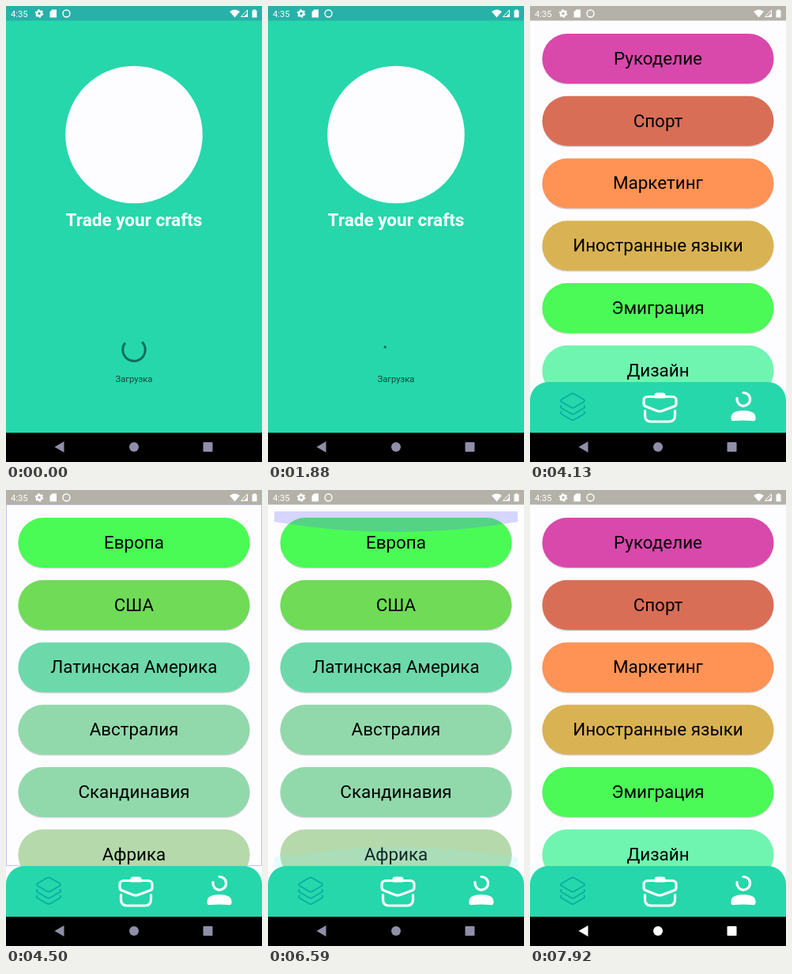
Recreate the animation shown at these times as an HTML page. Size 324 by 576 pixels, loop 8 s.

```html
<!DOCTYPE html>
<html lang="ru">
<head>
<meta charset="utf-8">
<style>
  html, body { margin: 0; width: 100%; height: 100%; overflow: hidden; background: #fdfdff; }
  svg { display: block; width: 100vw; height: 100vh; font-family: Roboto, sans-serif; }
  .item { font-size: 22.4px; text-anchor: middle; fill: #000; }
  .line { fill: none; stroke-linecap: round; stroke-linejoin: round; }
</style>
</head>
<body>
<svg viewBox="0 0 324 576">
  <defs>
    <clipPath id="port"><rect y="27" width="324" height="449"/></clipPath>
    <clipPath id="inner"><rect x="8" y="27" width="308" height="449"/></clipPath>
  </defs>
  <rect width="324" height="576" fill="#fdfdff"/>

  <g id="app">
    <g clip-path="url(#port)">
      <g id="topics"></g>
      <g id="regions"></g>
    </g>
    <rect id="frame" x=".5" y="18.5" width="323" height="456" fill="none" stroke="#c6c3ee"/>
    <g clip-path="url(#inner)">
      <path id="glowTop"/>
      <path id="glowBottom"/>
    </g>
    <path d="M0 540V498A23 23 0 0 1 23 475H301A23 23 0 0 1 324 498V540Z" fill="#26d7ab"/>
    <g class="line" stroke="#08aea2" stroke-width="1.800">
      <path d="M52 490Q54 489 56 490L68 497Q70 498.500 68 500L56 507Q54 508 52 507L40 500Q38 498.500 40 497Z"/>
      <path d="M39.500 505Q38 506.500 40 508L52 515Q54 516 56 515L68 508Q70 506.500 68.500 505"/>
      <path d="M39.500 512.500Q38 514 40 515.500L52 522.500Q54 523.500 56 522.500L68 515.500Q70 514 68.500 512.500"/>
    </g>
    <g class="line" stroke="#fff" stroke-width="3.200">
      <path d="M158 493.500H149Q144 493.500 144 498.500V502Q144 505 147 506L161 511.500Q164 512.500 167 511.500L182 506Q185 505 185 502V498.500Q185 493.500 180 493.500H170"/>
      <path d="M145.500 511.500V517Q145.500 525 153 525H176Q183.500 525 183.500 517V511.500"/>
      <path d="M159 494V492Q159 490 161 490H168Q170 490 170 492V494Z" fill="#fff"/>
      <path d="M270 488.500A8.300 8.300 0 1 1 262 495.500"/>
    </g>
    <path fill="#fff" d="M257 514Q262 511 270 511T283 514Q286 517 285.500 522Q285 525 281 524Q276 523.500 270 523.500T259 524Q255 525 254.500 522Q254 517 257 514Z"/>
  </g>

  <g id="splash">
    <rect width="324" height="540" fill="#26d7ab"/>
    <circle cx="162" cy="162.500" r="86.800" fill="#fdfdff"/>
    <text x="162" y="278" font-size="22.500" font-weight="700" text-anchor="middle" fill="#fff">Trade your crafts</text>
    <path id="spinner" fill="none" stroke="#0a6f5c" stroke-width="3"/>
    <text x="162" y="474.500" font-size="11.200" text-anchor="middle" fill="#0b4a3d">Загрузка</text>
  </g>

  <rect id="status" width="324" height="18.500"/>
  <g fill="#fff">
    <text x="6" y="13.800" font-size="11.200">4:35</text>
    <circle cx="42" cy="9.500" r="3" fill="none" stroke="#fff" stroke-width="2.400"/>
    <circle cx="42" cy="9.500" r="4.500" fill="none" stroke="#fff" stroke-width="1.600" stroke-dasharray="2.360 2.352"/>
    <path d="M58.500 4.500H64V14.500H55.500V7.500Z"/>
    <circle cx="76.500" cy="9.500" r="4.500" fill="none" stroke="#fff" stroke-width="1.400"/>
    <path d="M283 7Q289.500 2 296 7L289.500 14.500Z"/>
    <path d="M305.500 5V13.500H297.500Z" fill="none" stroke="#fff"/>
    <path d="M306 8.500V14H300.500Z"/>
    <path d="M313 4.500H316V5.500H317.500V14.500H311.500V5.500H313Z"/>
  </g>

  <rect y="539" width="324" height="37"/>
  <g id="keys">
    <path d="M61.500 557L73.500 550V564Z"/>
    <circle cx="162" cy="557" r="6"/>
    <rect x="249.500" y="551" width="12" height="12" rx="1"/>
  </g>
</svg>

<script>
const LOOP = 8000;
const OPEN = 2000, ENTER = 4200, ENTERED = 4520, KEYS = 7000, BACK = 7150;
const $ = id => document.getElementById(id);

const topics = [
  ['Рукоделие', '#d948ab'], ['Спорт', '#d96e56'], ['Маркетинг', '#ff9356'],
  ['Иностранные языки', '#d9b353'], ['Эмиграция', '#4bf957'], ['Дизайн', '#70f5b0']
];
const regions = [
  ['Европа', '#4bfb55'], ['США', '#6fdb57'], ['Латинская Америка', '#6dd9ab'],
  ['Австралия', '#91d9ab'], ['Скандинавия', '#91d9ab'], ['Африка', '#b5d9ab']
];

const pills = list => list.map(([label, color], i) => {
  const y = 35 + i * 78.75;
  const pill = (top, fill) =>
    `<rect x="15.500" y="${top}" width="293" height="63" rx="31.500" fill="${fill}"/>`;
  return pill(y + 1.3, '#d3d0d6') + pill(y, color) +
    `<text class="item" x="162" y="${y + 38.8}">${label}</text>`;
}).join('');
$('topics').innerHTML = pills(topics);
$('regions').innerHTML = pills(regions);

const clamp = x => Math.max(0, Math.min(1, x));
const ramp = (t, a, b) => clamp((t - a) / (b - a));
const out = x => 1 - (1 - x) ** 3;
const show = (id, on) => $(id).setAttribute('display', on ? 'inline' : 'none');

// Fast-out, slow-in: cubic-bezier(.4, 0, .2, 1)
function standard(x) {
  let lo = 0, hi = 1;
  for (let i = 0; i < 20; i++) {
    const s = (lo + hi) / 2, r = 1 - s;
    if (1.2 * r * r * s + 0.6 * r * s * s + s ** 3 < x) lo = s; else hi = s;
  }
  return 3 * (1 - lo) * lo * lo + lo ** 3;
}

function spin(t) {
  const turn = t / 1333.3 + 0.575, phase = turn % 1;
  const tail = 270 * standard(clamp(phase * 2 - 1));
  const head = 270 * standard(clamp(phase * 2)) + 11;
  const base = 297 + 0.2295 * t + 270 * Math.floor(turn);
  const point = deg => {
    const a = deg * Math.PI / 180;
    return `${162 + 14.2 * Math.cos(a)} ${434.3 + 14.2 * Math.sin(a)}`;
  };
  const large = head - tail > 180 ? 1 : 0;
  $('spinner').setAttribute('d',
    `M${point(base + tail)}A14.2 14.2 0 ${large} 1 ${point(base + head)}`);
}

// Overscroll glow; it turns from lavender to cyan as it fades
function glow(id, edge, dir, depth, alpha, fade) {
  const sag = Math.min(depth, 6 + depth * 0.26);
  const side = edge + dir * (depth - sag);
  const peak = edge + dir * (depth + sag);
  const el = $(id);
  el.setAttribute('d', `M8 ${edge}V${side}Q162 ${peak} 316 ${side}V${edge}Z`);
  el.setAttribute('fill', `rgb(110,${Math.min(255, 110 + 200 * fade)},255)`);
  el.setAttribute('opacity', 0.28 * alpha * (1 - fade * fade));
}

function draw(t) {
  const splash = t < OPEN;
  show('splash', splash);
  show('app', !splash);
  $('status').setAttribute('fill', splash ? '#27b1a9' : '#b4b2a8');
  $('keys').setAttribute('fill', t >= KEYS ? '#fff' : '#918ea9');
  if (splash) return spin(t);

  const inside = t >= ENTER && t < BACK;
  const enter = out(ramp(t, ENTER, ENTERED));
  show('topics', !inside || enter < 1);
  show('regions', inside);
  show('frame', inside && t < ENTERED + 60);
  $('topics').setAttribute('opacity', inside ? 1 - enter : 1);
  $('regions').setAttribute('opacity', enter);

  const scroll = 24 * (out(ramp(t, 5150, 5380)) - out(ramp(t, 6080, 6280)));
  const scale = 0.9 + 0.1 * enter;
  $('regions').setAttribute('transform',
    `translate(${162 * (1 - scale)} ${251 * (1 - scale) - scroll}) scale(${scale})`);

  const lowFade = ramp(t, 5780, 7000), topFade = ramp(t, 6620, 7100);
  glow('glowBottom', 476, -1, 53 * out(ramp(t, 5340, 5580)) * (1 - 0.8 * lowFade),
    ramp(t, 5340, 5460), lowFade);
  glow('glowTop', 27, 1, 26 * out(ramp(t, 6260, 6560)) * (1 - 0.5 * topFade),
    ramp(t, 6260, 6400), topFade);
}

const start = performance.now();
function tick() {
  draw((performance.now() - start) % LOOP);
  requestAnimationFrame(tick);
}
tick();
</script>
</body>
</html>
```
